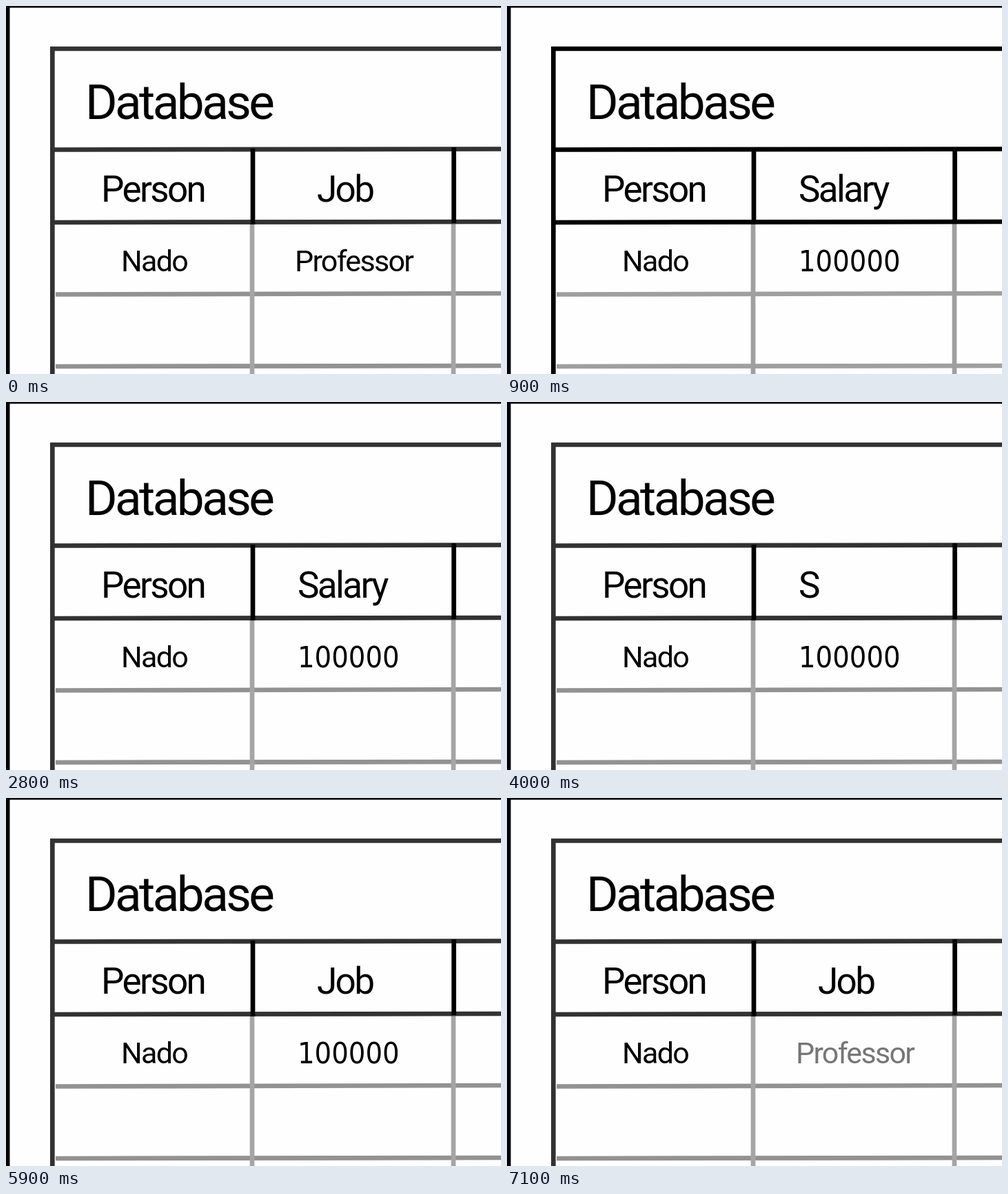
Write an HTML page that moves like this. It is 718 by 534 pixels and loops after 7.2 s.

```html
<!DOCTYPE html>
<html lang="en">
<head>
<meta charset="utf-8">
<title>Database table</title>
<style>
  html, body { margin: 0; width: 100%; height: 100%; overflow: hidden; background: #fefefe; }
  svg { display: block; width: 718px; height: 534px; }
  path { fill: none; stroke: #000; stroke-width: 6.7; }
  text { font-family: Roboto, sans-serif; letter-spacing: -.05em; fill: #000; }
  .title { font-size: 71px; }
  .head { font-size: 53px; }
  .cell { font-size: 43px; letter-spacing: -.04em; }
  #number { font-family: "DejaVu Sans Condensed", Roboto, sans-serif; font-stretch: 75%; letter-spacing: 0; }
</style>
</head>
<body>
<svg viewBox="0 0 718 534">
  <rect width="5.5" height="534"/>
  <rect width="718" height="2.5"/>
  <path id="rows" d="M72 418.5L718 417M72 523L718 522"/>
  <path id="columns" d="M357 316V534M649 314V534"/>
  <path id="border" d="M67.3 534V62H718M70 208.5L718 207.5M70 314L718 313"/>
  <path d="M358 207V317M649.6 205V315"/>
  <text class="title" x="115" y="164">Database</text>
  <text class="head" x="138" y="284">Person</text>
  <text class="head" x="451" y="284" id="job">Job</text>
  <text class="head" x="423" y="284" id="salary">Salary</text>
  <text class="cell" x="215" y="385" text-anchor="middle">Nado</text>
  <text class="cell" x="419" y="385" id="professor">Professor</text>
  <text class="cell" x="423" y="385" id="number">100000</text>
</svg>
<script>
const LOOP = 7200, DISSOLVE = 900, FADE = 213;
const ERASE = [3000, 3200, 3400, 3700, 3900, 4100];
const TYPE = [4300, 4500, 4700];

const el = id => document.getElementById(id);
const ramp = (t, start, length) => Math.min(1, Math.max(0, (t - start) / length));
const passed = (times, t) => times.filter(time => t >= time).length;

function show(id, opacity, text) {
  const node = el(id);
  node.setAttribute("opacity", opacity);
  if (text !== undefined && node.textContent !== text) node.textContent = text;
}

function draw(t) {
  const fresh = ramp(t, 0, DISSOLVE);
  const dissolving = t < DISSOLVE;

  show("job", dissolving ? 1 - fresh : 1,
       dissolving ? "Job" : "Job".slice(0, passed(TYPE, t)));
  show("salary", fresh, "Salary".slice(0, 6 - passed(ERASE, t)));
  show("number", fresh * (1 - ramp(t, 6457, FADE)));
  show("professor", dissolving ? 1 - fresh : ramp(t, LOOP - FADE, FADE));

  const strong = t >= DISSOLVE && t < 2800;
  el("border").style.stroke = strong ? "#000" : "#323232";
  el("rows").style.stroke = strong ? "#9f9f9f" : "#929292";
  el("columns").style.stroke = strong ? "#9f9f9f" : "#a5a5a5";
}

const start = performance.now();
function frame() {
  draw((performance.now() - start) % LOOP);
  requestAnimationFrame(frame);
}
frame();
</script>
</body>
</html>
```
